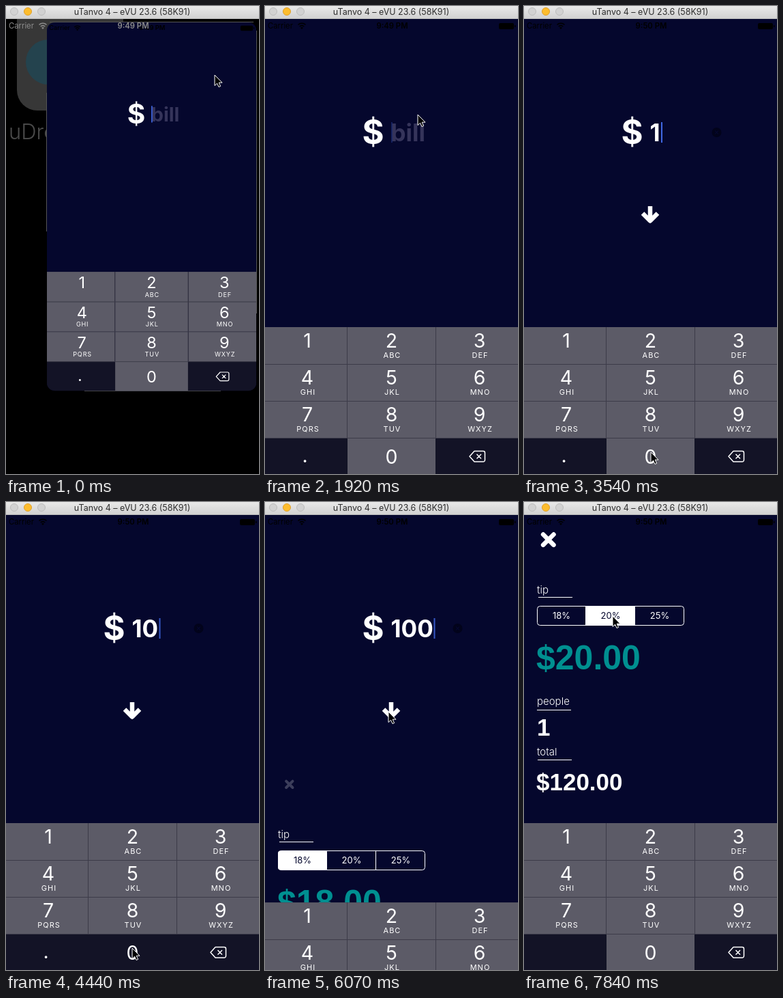
An HTML page for the animation above (7.99 s loop, 371 by 685 pixels).

```html
<!DOCTYPE html>
<html lang="en">
<head>
<meta charset="utf-8">
<title>Tip calculator</title>
<style>
  html, body { margin: 0; width: 100%; height: 100%; overflow: hidden; background: #000; }
  svg { display: block; width: 100vw; height: 100vh; }
  text { font-family: Inter, Roboto, sans-serif; fill: #fff; white-space: pre; }
  .mid { text-anchor: middle; }
  .digit { font-size: 28.5px; }
  .letters { font-size: 11px; letter-spacing: 1px; }
  .amount { font-size: 35px; font-weight: 700; }
  .label { font-size: 15px; font-weight: 300; }
  .sum { font-family: "Liberation Sans", Arial, sans-serif; font-weight: 700; font-kerning: none; }
  .seg { font-size: 13px; }
  .status text { font-size: 11.3px; fill: currentColor; }
  .clock { font-weight: 600; }
  .caret { fill: #4068e4; }
  .line { fill: none; stroke: #fff; }
</style>
</head>
<body>
<svg viewBox="0 0 371 685" preserveAspectRatio="none">
  <defs>
    <linearGradient id="chrome" x2="0" y2="1">
      <stop stop-color="#e9e9e9"/><stop offset="1" stop-color="#d0d0d0"/>
    </linearGradient>
    <clipPath id="screen"><rect id="corners" y="19" width="371" height="666"/></clipPath>
  </defs>

  <rect width="371" height="685"/>
  <g id="home">
    <rect x="16" y="-10" width="156" height="163" rx="30" fill="#373737"/>
    <circle cx="62" cy="82" r="33" fill="#24434e"/>
    <text x="4" y="195" font-size="31" font-weight="300" style="fill:#4a4a4a">uDrolm</text>
    <path d="M64 23.5H363M59.5 127V330M367.5 36V450M115 563.5H315" stroke="#555"/>
  </g>

  <g id="app"><g clip-path="url(#screen)">
    <rect y="19" width="371" height="666" fill="#05072d"/>
    <text class="mid" x="158.5" y="201.5" font-size="49" font-weight="700">$</text>
    <text class="amount" id="bill" x="184.5" y="198"></text>
    <rect class="caret" id="billCaret" y="170" width="2" height="30"/>
    <g id="entered">
      <circle cx="282.5" cy="185" r="7" fill="#02031b"/>
      <path d="M280 182.5l5 5m0-5l-5 5" stroke="#05072d" stroke-width="1.3"/>
      <path class="line" d="M185 293V313M174 303.5L185 314.5L196 303.5" stroke-width="6.5" stroke-linejoin="round"/>
    </g>

    <g id="modal">
      <rect y="19" width="371" height="666" fill="#05072d"/>
      <path id="close" class="line" d="M-7.700-7.700L7.700 7.700M7.700-7.700L-7.700 7.700" stroke-width="6.5" stroke-linecap="round"/>
      <text class="label" x="19" y="134">tip</text>
      <text class="label" x="19" y="296.5">people</text>
      <text class="label" x="19" y="370.5">total</text>
      <path class="line" d="M21 139.5h50M19 304.5h50M20 377.5h50"/>
      <rect id="chosen" y="152.5" width="72" height="28" fill="#fff"/>
      <rect class="line" x="19.5" y="152.5" width="215" height="28" rx="4"/>
      <path class="line" d="M90.5 153v27M162.5 153v27"/>
      <g id="segments"></g>
      <text class="sum" id="tip" x="18" y="244.5" font-size="50" style="fill:#008f90"></text>
      <text class="sum" x="19" y="342" font-size="35">1</text>
      <rect class="caret" id="peopleCaret" x="37.5" y="313" width="2" height="30"/>
      <text class="sum" id="total" x="18" y="421.5" font-size="35"></text>
    </g>

    <g class="status" color="#000"></g>
    <path d="M345 25h18a2 2 0 0 1 2 2v5a2 2 0 0 1-2 2h-18a2 2 0 0 1-2-2v-5a2 2 0 0 1 2-2zM366 28h1.500v3h-1.500z"/>

    <g id="keypad">
      <rect y="470" width="371" height="216" fill="#131326"/>
      <g id="keys"></g>
      <path d="M0 524.5H371M0 578.5H371M0 632.5H371M120.5 470V632M250.5 470V632" stroke="#3c3b49"/>
      <g id="legends"></g>
      <text class="mid digit" id="point" x="58.5" y="668">.</text>
      <path class="line" d="M307 651.5H320a2.500 2.500 0 0 1 2.500 2.500v10.500a2.500 2.500 0 0 1-2.500 2.500H307L300 659.300ZM310.500 656l6.500 6.500m0-6.500l-6.500 6.500" stroke-width="1.5" stroke-linejoin="round"/>
    </g>
  </g></g>

  <g class="status" id="homeStatus" color="#8c8c8c"></g>

  <rect width="371" height="19" fill="url(#chrome)"/>
  <path d="M0 18.5H371" stroke="#bdbdbd"/>
  <g stroke="#bcbcbc" fill="#d2d2d2">
    <circle cx="12" cy="8" r="5.5"/>
    <circle cx="32" cy="8" r="5.5" fill="#fdbd2e" stroke="#e0a02a"/>
    <circle cx="52" cy="8" r="5.5"/>
  </g>
  <text class="mid" x="185" y="13" font-size="12.5" style="fill:#2e2e2e">uTanvo 4 – eVU 23.6 (58K91)</text>

  <path id="pointer" d="M0 0V15.500L3.600 12.200L6 17.500L8.600 16.400L6.200 11.200H11Z" stroke="#fff"/>
</svg>

<script>
const LOOP = 7990, STEPS = 54;
const NAVY = '#05072d', KEY = '#5c5b67', KEY_DOWN = '#131326';
const $ = id => document.getElementById(id);
const clamp = v => Math.max(0, Math.min(1, v));
const set = (id, attrs) => { for (const a in attrs) $(id).setAttribute(a, attrs[a]); };

for (const status of document.querySelectorAll('.status')) status.innerHTML = `
  <text x="4" y="33">Carrier</text>
  <path d="M48.500 27.500a8 8 0 0 1 11 0M50.700 30a5 5 0 0 1 6.600 0" fill="none" stroke="currentColor" stroke-width="1.6"/>
  <path d="M54 34l-2-2.200a3 3 0 0 1 4 0z" fill="currentColor"/>
  <text class="mid clock" x="186.5" y="33"></text>`;
const clocks = document.querySelectorAll('.clock');

// Keypad: three columns, four rows, the last row holding only the zero.
const columns = [[0, 120, 62], [121, 129, 185.5], [251, 120, 314.5]];
const letters = ['', 'ABC', 'DEF', 'GHI', 'JKL', 'MNO', 'PQRS', 'TUV', 'WXYZ'];
let keys = '', legends = '';
for (let i = 0; i < 10; i++) {
  const digit = (i + 1) % 10, row = Math.floor(i / 3);
  const [x, width, center] = columns[digit ? i % 3 : 1];
  const top = 470 + row * 54;
  keys += `<rect id="key${digit}" x="${x}" y="${top}" width="${width}" height="54"/>`;
  legends += `<text class="mid digit" x="${center}" y="${top + (digit ? 30 : 37.5)}">${digit}</text>`;
  if (letters[i]) legends += `<text class="mid letters" x="${center + 1}" y="${top + 45}">${letters[i]}</text>`;
}
$('keys').innerHTML = keys;
$('legends').innerHTML = legends;
set('keys', { fill: KEY });

$('segments').innerHTML = [18, 20, 25].map((p, i) =>
  `<text class="mid seg" id="seg${i}" x="${55 + i * 72}" y="171">${p}%</text>`).join('');

// Typed amounts: start time, text, caret position
const entries = [[0, '', 185], [3107, '1', 201], [3847, '10', 224.5], [4587, '100', 247.5]];
// Key presses: start, end, digit
const presses = [[2900, 3090, 1], [3660, 3830, 0], [4400, 4570, 0]];
const pointerPath = [
  [0, 306, 101], [296, 304, 106], [444, 304, 106], [1036, 224, 159], [1924, 224, 159],
  [2810, 60, 492], [3107, 60, 492], [3551, 186, 653], [4590, 185, 653], [5326, 181, 307],
  [6066, 181, 307], [6362, 179.5, 306], [6660, 152, 250], [7420, 130, 167], [LOOP, 130, 167]
];

function pointerAt(t) {
  const i = pointerPath.findIndex(p => p[0] > t);
  const [t0, x0, y0] = pointerPath[i - 1], [t1, x1, y1] = pointerPath[i];
  const u = (t - t0) / (t1 - t0), e = u * u * (3 - 2 * u);
  return [x0 + (x1 - x0) * e, y0 + (y1 - y0) * e];
}

// Critically damped spring: remaining fraction of the travel
function remaining(t, start) {
  const x = Math.max(0, t - start) * 0.01826;
  return (1 + x) * Math.exp(-x);
}

const blink = age => age < 500 ? 1 : clamp(0.55 - 1.2 * Math.sin((age - 625) / 888 * 2 * Math.PI));

function draw(t) {
  // Launch zoom
  const launch = t < 250 ? Math.exp(-t / 78) : 0;
  const sx = 1 - 0.1725 * launch, sy = 1 - 0.1905 * launch;
  set('app', { transform: `translate(${60 * launch} ${19 + 5 * launch - 19 * sy}) scale(${sx} ${sy})` });
  set('corners', { rx: 14 * launch });
  set('home', { opacity: launch });
  set('homeStatus', { opacity: launch });
  for (const clock of clocks) clock.textContent = t < 2400 ? '9:49 PM' : '9:50 PM';

  // Bill entry
  const [since, typed, caretX] = entries.filter(e => e[0] <= t + 5).pop();
  $('bill').textContent = typed || 'bill';
  $('bill').style.fill = typed ? '#fff' : '#35345a';
  set('billCaret', { x: caretX, opacity: blink(t - since) });
  set('entered', { opacity: clamp((t - 3000) / 220) });
  for (const digit of [0, 1]) {
    const down = presses.some(([a, b, key]) => key === digit && t >= a && t < b);
    set('key' + digit, { fill: down ? KEY_DOWN : KEY });
  }

  // Keypad leaves, then returns with the tip sheet
  const sheetStart = 5981, sheetOpen = t >= sheetStart;
  const rest = remaining(t, sheetStart);
  const padOffset = 216 * (sheetOpen ? rest : 1 - remaining(t, 5727));
  set('keypad', { transform: `translate(0 ${padOffset})` });
  set('point', { opacity: sheetOpen ? 0 : 1 });
  set('modal', { transform: `translate(0 ${666 * rest})` });
  const shown = clamp((t - 5960) / 480);
  set('close', { opacity: shown, transform: `translate(35.8 55.2) scale(${0.5 + shown / 2})` });
  set('peopleCaret', { opacity: blink(t - 6066) });

  // Tip choice
  const choice = t < 7800 ? 0 : 1;
  set('chosen', { x: choice ? 90.5 : 19, rx: choice ? 0 : 4 });
  for (let i = 0; i < 3; i++) $('seg' + i).style.fill = i === choice ? NAVY : '#fff';
  $('tip').textContent = ['$18.00', '$20.00'][choice];
  $('total').textContent = ['$118.00', '$120.00'][choice];

  set('pointer', { transform: `translate(${pointerAt(t)})` });
}

// The picture advances in even steps of about 148 ms.
const begin = performance.now();
function tick() {
  const t = (performance.now() - begin) % LOOP;
  const step = Math.min(STEPS - 1, Math.floor((t + 12) * STEPS / LOOP));
  draw(step * LOOP / STEPS);
  requestAnimationFrame(tick);
}
tick();
</script>
</body>
</html>
```
